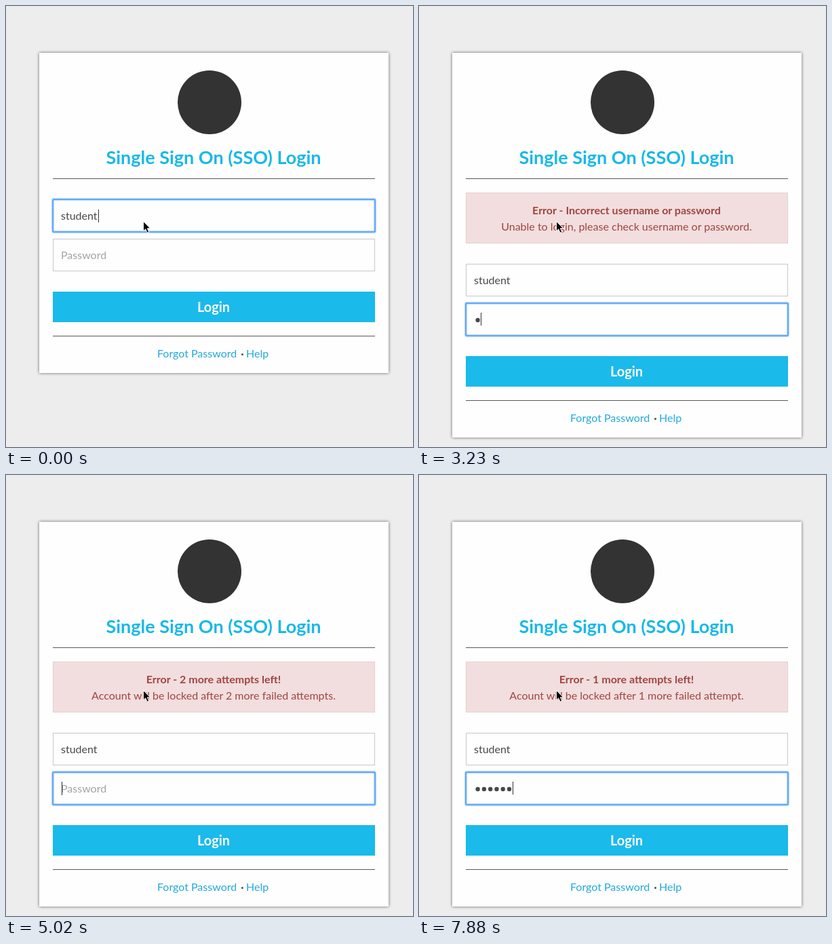
Animation of 600x650 px, one loop 8 s. Source, as an HTML page:

```html
<!DOCTYPE html>
<html lang="en">
<head>
<meta charset="utf-8">
<title>Login</title>
<style>
  html, body { margin: 0; width: 100%; height: 100%; overflow: hidden; background: #ededed; }
  svg { display: block; font: 16px Lato, sans-serif; }
  .card { fill: #fefefe; filter: drop-shadow(0 0 2px rgb(0 0 0 / .6)); }
  .mid { text-anchor: middle; }
  .bold { font-weight: 700; }
  .blue { fill: #1ab8e8; }
  .link { fill: #22a9dc; }
  .rule { fill: #5a5a5a; }
  .field { fill: #fefefe; stroke: #c8c8c8; }
  .focus { fill: none; stroke: #64a8f4; stroke-width: 2; filter: drop-shadow(0 0 1px #5aa5f8); }
  .alert rect { fill: #f2dede; stroke: #e7cfd0; }
  .alert text { fill: #a04541; }
  .ink { fill: #484848; }
  .hint { fill: #a3a3a3; }
</style>
</head>
<body>
<svg width="600" height="650" viewBox="0 0 600 650">
  <rect id="card" class="card" x="49" y="69" width="515" height="472"/>
  <circle cx="300" cy="142" r="47" fill="#333"/>
  <text class="mid bold blue" x="306" y="233" font-size="27">Single Sign On (SSO) Login</text>
  <rect class="rule" x="69" y="254" width="475" height="1"/>

  <g id="alert" class="alert mid">
    <rect x="69.5" y="275.5" width="474" height="74"/>
    <text id="title" class="bold" x="306" y="307"></text>
    <text id="detail" x="306" y="331"></text>
  </g>

  <g id="form">
    <rect class="field" x="69.5" y="285.5" width="474" height="47"/>
    <rect class="field" x="69.5" y="343.5" width="474" height="47"/>
    <rect id="focus" class="focus" x="69" y="285" width="475" height="48" rx="1"/>
    <text class="ink" x="81" y="315">student</text>
    <text id="hint" class="hint" x="81" y="373">Password</text>
    <g id="dots" class="ink"></g>
    <rect id="caret" fill="#333" width="1"/>
    <rect fill="#1abaea" x="69" y="421" width="475" height="45"/>
    <text class="mid bold" x="306" y="451" font-size="20" fill="#fff">Login</text>
    <rect class="rule" x="69" y="486" width="475" height="1"/>
    <text class="link" x="223" y="518">Forgot Password</text>
    <text class="mid bold ink" x="348.5" y="518">·</text>
    <text class="link" x="354" y="518">Help</text>
  </g>

  <path d="M202.5 317.5v14.3l3.2-3 2.4 5.4 2.6-1.1-2.4-5.3h4.4z" stroke="#fff"/>
</svg>
<script>
const $ = id => document.getElementById(id);
const LOOP = 8000, LEFT = 82, PITCH = 9.28;

const messages = [
  null,
  ["Error - Incorrect username or password", "Unable to login, please check username or password."],
  ["Error - 2 more attempts left!", "Account will be locked after 2 more failed attempts."],
  ["Error - 1 more attempts left!", "Acount will be locked after 1 more failed attempt."]
];

// [start ms, message, characters typed]; -1 is an empty field with its caret blinked off
const steps = [
  [0, 0, 0], [360, 1, 0], [1080, 1, -1], [1440, 1, 0],
  [1800, 1, 5], [2160, 1, 12], [2510, 1, 15],
  [3230, 1, 1], [3590, 1, 6], [3950, 1, 12], [4300, 1, 18], [4660, 1, 21],
  [5020, 2, 0], [5380, 2, 2], [5740, 2, 4], [6090, 2, 10],
  [6810, 3, 0], [7170, 3, -1], [7530, 3, 2], [7880, 3, 6]
];

const set = (el, attrs) => {
  for (const key in attrs) el.setAttribute(key, attrs[key]);
};
const show = (el, on) => set(el, { visibility: on ? "visible" : "hidden" });

for (let i = 0; i < 21; i++) {
  const dot = document.createElementNS("http://www.w3.org/2000/svg", "circle");
  set(dot, { cx: LEFT + PITCH * (i + .5), cy: 368, r: 3.2 });
  $("dots").append(dot);
}

function render([, message, typed]) {
  const failed = message > 0;
  show($("alert"), failed);
  if (failed) [$("title").textContent, $("detail").textContent] = messages[message];
  set($("card"), { height: failed ? 567 : 472 });
  set($("form"), { transform: `translate(0 ${failed ? 95 : 0})` });
  set($("focus"), { y: failed ? 343 : 285 });
  show($("hint"), typed < 1);
  [...$("dots").children].forEach((dot, i) => show(dot, i < typed));
  show($("caret"), typed >= 0);
  set($("caret"), {
    x: failed ? Math.round(LEFT + PITCH * Math.max(typed, 0)) : 136,
    y: failed ? 357 : 300,
    height: failed && typed < 1 ? 20 : 19
  });
}

let current;
function tick() {
  const t = performance.now() % LOOP;
  const step = steps.findLast(s => s[0] <= t);
  if (step !== current) render(current = step);
  requestAnimationFrame(tick);
}
tick();
</script>
</body>
</html>
```
